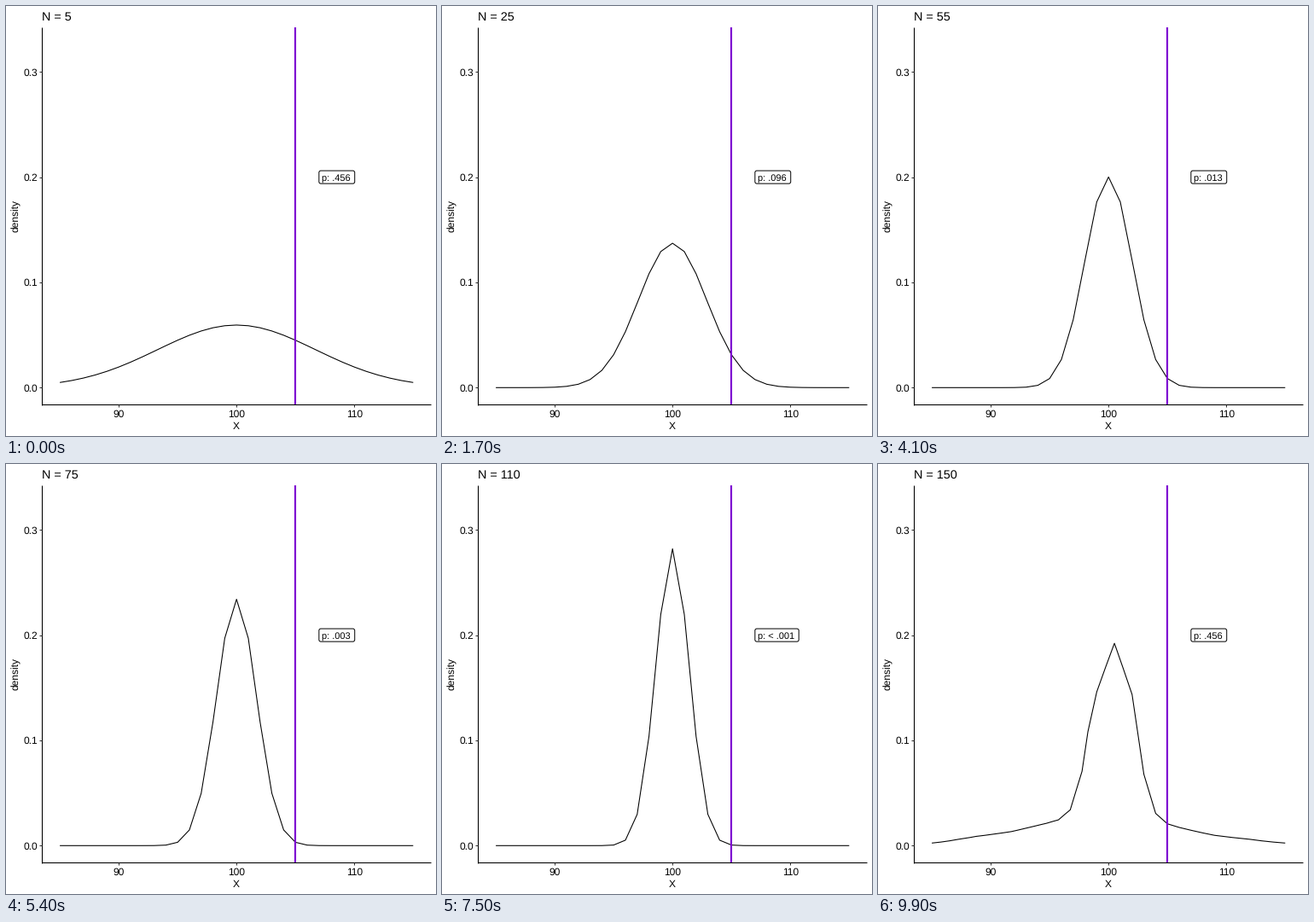
These frames come from a looping animation (504 by 504 pixels, 10 s). A matplotlib script:

```python
import math

import numpy as np
import matplotlib.pyplot as plt
from matplotlib.animation import FuncAnimation
from matplotlib.patches import FancyBboxPatch

plt.rcParams.update({
    "font.family": "Liberation Sans",
    "text.hinting": "none",
    "path.simplify": False,
})

SIZE, DPI = 504, 72          # one point equals one pixel
MEAN, SD, CUT = 100, 15, 105
SAMPLES = np.arange(5, 151, 5)
GRID = np.arange(85.0, 116.0)
POINTS = 50                  # vertices per curve while morphing
LONG = 11                    # the first transitions take one frame more

LEFT, RIGHT, TOP, BOTTOM = 42.4, 498.0, 25.3, 467.4
X_UNIT = (RIGHT - LEFT) / 33
Y_UNIT = 1233.5
ZERO = 447.3
THIN = 1.07
PURPLE = "#7D00D1"


def px(x):
    return LEFT + (x - 83.5) * X_UNIT


def py(y):
    return ZERO - y * Y_UNIT


def refine(x, y):
    """Halve the longest edges until the curve has POINTS vertices."""
    length = np.sqrt(np.diff(x) ** 2 + np.diff(y) ** 2)
    edges = np.argsort(-length, kind="stable")[:POINTS - len(x)]
    edges.sort()
    mid = lambda v: np.insert(v, edges + 1, (v[edges] + v[edges + 1]) / 2)
    return np.array([mid(x), mid(y)])


def density_curve(n):
    se = SD / math.sqrt(n)
    z = (GRID - MEAN) / se
    return refine(GRID, np.exp(-0.5 * z * z) / (se * math.sqrt(2 * math.pi)))


def p_label(n):
    z = (CUT - MEAN) * math.sqrt(n) / SD
    p = math.erfc(z / math.sqrt(2))
    return "p: < .001" if p < 0.0005 else "p: " + f"{p:.3f}"[1:]


CURVES = [density_curve(n) for n in SAMPLES]
LABELS = [p_label(n) for n in SAMPLES]


def phase(i):
    """Current state, next state and progress between them."""
    if i < 4 * LONG:
        state, step = divmod(i, 4)
        t = step / 3
    else:
        state, step = divmod(i - 4 * LONG, 3)
        state += LONG
        t = step / 2
    return state, (state + 1) % len(SAMPLES), t


fig = plt.figure(figsize=(SIZE / DPI, SIZE / DPI), dpi=DPI, facecolor="white")
ax = fig.add_axes([0, 0, 1, 1])
ax.set(xlim=(0, SIZE), ylim=(SIZE, 0))
ax.axis("off")


def segment(xs, ys, color="black", width=THIN, z=2):
    ax.plot(xs, ys, color=color, lw=width, solid_capstyle="butt", zorder=z)


def text(x, y, s, size=12, ha="center", **kw):
    return ax.text(x, y, s, fontsize=size, ha=ha, va="baseline",
                   color="black", **kw)


segment([LEFT, LEFT], [TOP, BOTTOM + 0.5])
segment([LEFT, RIGHT], [BOTTOM, BOTTOM])
for v in (90, 100, 110):
    segment([px(v)] * 2, [BOTTOM, BOTTOM + 3], "#333333")
    text(px(v), 482, str(v))
for v in (0.0, 0.1, 0.2, 0.3):
    segment([LEFT - 3, LEFT], [py(v)] * 2, "#333333")
    text(37, py(v) + 4.3, f"{v:.1f}", ha="right")
text(px(MEAN), 496.3, "X")
text(15, (TOP + BOTTOM) / 2, "density", ha="right", rotation=90,
     rotation_mode="default").set(ha="right", va="center", x=17.8)
segment([px(CUT)] * 2, [TOP, BOTTOM], PURPLE, 2.13, 4)

curve, = ax.plot([], [], color="black", lw=THIN, solid_capstyle="butt",
                 solid_joinstyle="round", snap=False, zorder=3)
title = text(LEFT - 0.4, 17, "", 14.4, "left")
BOX_X, BOX_Y, BOX_H, PAD = px(107), py(0.2), 15.1, 3.6
box = FancyBboxPatch((BOX_X, BOX_Y - BOX_H / 2), 41, BOX_H,
                     boxstyle="round,pad=0,rounding_size=2.2",
                     fc="white", ec="black", lw=1, zorder=5)
ax.add_patch(box)
label = text(BOX_X + PAD, 205, "", 11.04, "left", zorder=6)


def draw(i):
    a, b, t = phase(i)
    x, y = CURVES[a] * (1 - t) + CURVES[b] * t
    curve.set_data(px(x), py(y))
    title.set_text(f"N = {SAMPLES[a if t <= 0.5 else b]}")
    label.set_text(LABELS[a if t < 0.5 else b])
    box.set_width(label.get_window_extent().width + 2 * PAD + 1)
    return curve, title, label, box


anim = FuncAnimation(fig, draw, frames=100, interval=100, repeat=True,
                     repeat_delay=0, blit=False)
plt.show()
```
